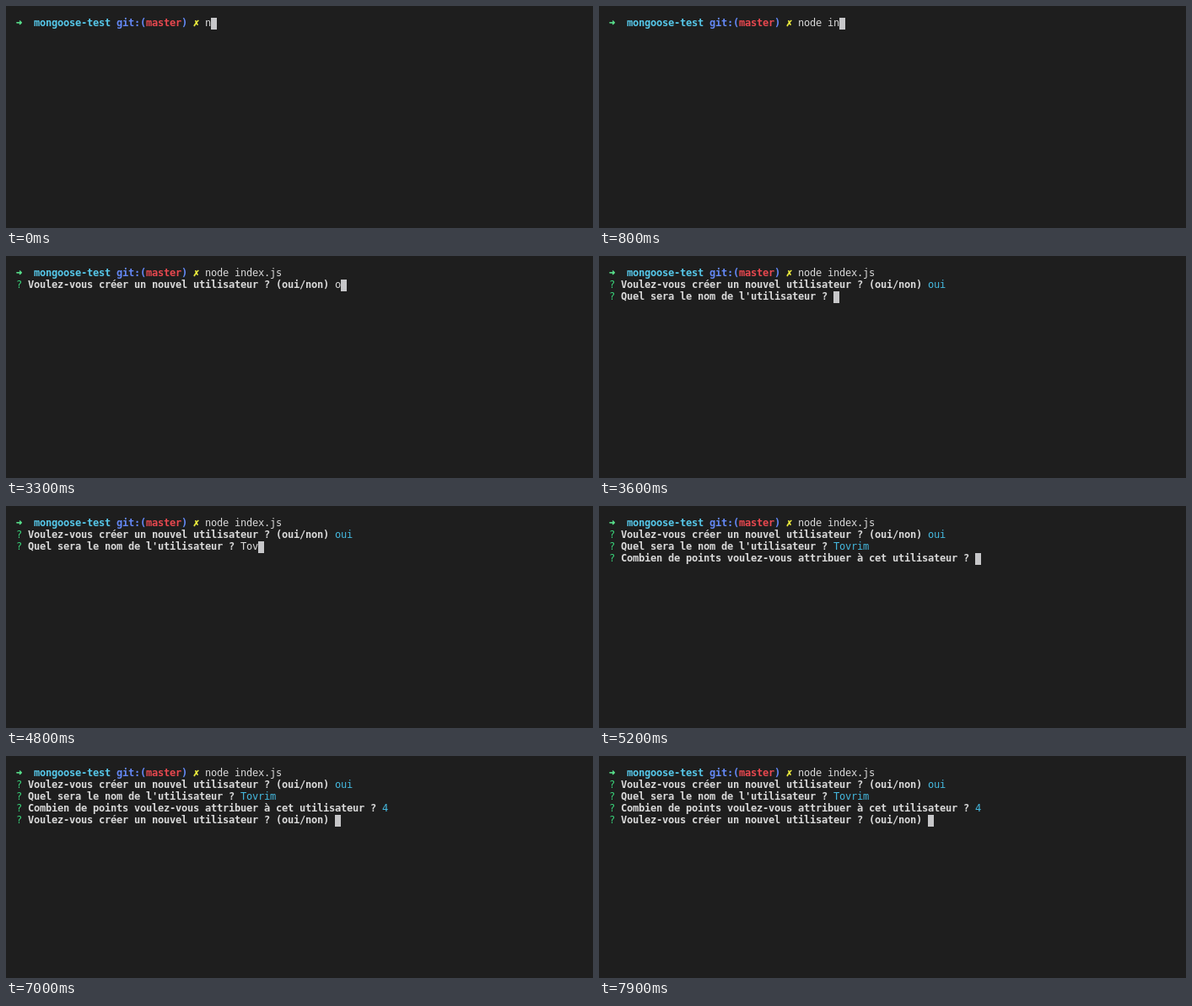
Recreate the animation shown at these times as an HTML page. Size 696 by 264 pixels, loop 8 s.

```html
<!DOCTYPE html>
<html lang="fr">
<head>
<meta charset="utf-8">
<title>Terminal</title>
<style>
  html, body { margin: 0; width: 100%; height: 100%; overflow: hidden; background: #1e1e1e; }
  #term { position: relative; width: 696px; height: 264px; overflow: hidden; }
  #term span {
    position: absolute; height: 14px; white-space: pre; color: #dadada;
    font: 12px/12px "DejaVu Sans Mono", "Liberation Mono", monospace;
    letter-spacing: calc(7px - 1ch);
  }
  #term .bold { font-weight: bold; }
  #term .arrow { color: #5ae68f; font-weight: bold; -webkit-text-stroke: 0.4px; }
  #term .dir { color: #56c8ea; font-weight: bold; }
  #term .git { color: #6489f7; font-weight: bold; }
  #term .branch { color: #e8484f; font-weight: bold; }
  #term .dirty { color: #f8f840; font-weight: bold; -webkit-text-stroke: 0.4px; }
  #term .mark { color: #38cf78; }
  #term .done { color: #45b9df; }
  #cursor { width: 7px; background: #c7c7c9; }
</style>
</head>
<body>
<div id="term"></div>
<script>
const LOOP = 8000, CELL = 7, ROW = 14, LEFT = 12, TOP = 14;
const term = document.getElementById('term');

function place(el, col, row) {
  el.style.left = LEFT + col * CELL + 'px';
  el.style.top = TOP + row * ROW + 'px';
}

function put(text, col, row, cls = '') {
  const el = document.createElement('span');
  el.textContent = text;
  el.className = cls;
  place(el, col, row);
  term.append(el);
  return el;
}

const cursor = put('', 0, 0);
cursor.id = 'cursor';

put('➜', 0, 0, 'arrow');
put('mongoose-test', 3, 0, 'dir');
put('git:(', 17, 0, 'git');
put('master', 22, 0, 'branch');
put(')', 28, 0, 'git');
put('✗', 30, 0, 'dirty');

// keys: the moment each character appears
const command = { text: 'node index.js ', col: 32, row: 0, enter: 1100,
  keys: [0, 100, 200, 300, 500, 700, 800, 900, 900, 900, 900, 900, 900, 900] };
command.input = put('', command.col, 0);

const again = 'Voulez-vous créer un nouvel utilisateur ? (oui/non) ';
const prompts = [
  { ask: again, start: 2000, text: 'oui', keys: [3300, 3400, 3500], enter: 3600 },
  { ask: "Quel sera le nom de l'utilisateur ? ", start: 3600, text: 'Tovrim',
    keys: [4600, 4700, 4800, 4900, 5000, 5100], enter: 5200 },
  { ask: 'Combien de points voulez-vous attribuer à cet utilisateur ? ', start: 5200,
    text: '4', keys: [6600], enter: 7000 },
  { ask: again, start: 7000, text: '', keys: [], enter: Infinity }
];
prompts.forEach((p, i) => {
  p.row = i + 1;
  p.col = 2 + p.ask.length;
  p.label = [put('?', 0, p.row, 'mark'), put(p.ask, 2, p.row, 'bold')];
  p.input = put('', p.col, p.row);
});

function type(line, t) {
  const n = line.keys.filter(k => k <= t).length;
  line.input.textContent = line.text.slice(0, n);
  return n;
}

function draw(t) {
  const n = type(command, t);
  if (t < command.enter) place(cursor, command.col + n, 0);
  else place(cursor, 0, 1);
  for (const p of prompts) {
    const shown = t >= p.start;
    for (const el of p.label) el.style.visibility = shown ? 'visible' : 'hidden';
    const count = type(p, t);
    p.input.className = t >= p.enter ? 'done' : '';
    if (shown) place(cursor, p.col + count, p.row);
  }
}

function frame() {
  draw(performance.now() % LOOP);
  requestAnimationFrame(frame);
}
frame();
</script>
</body>
</html>
```
